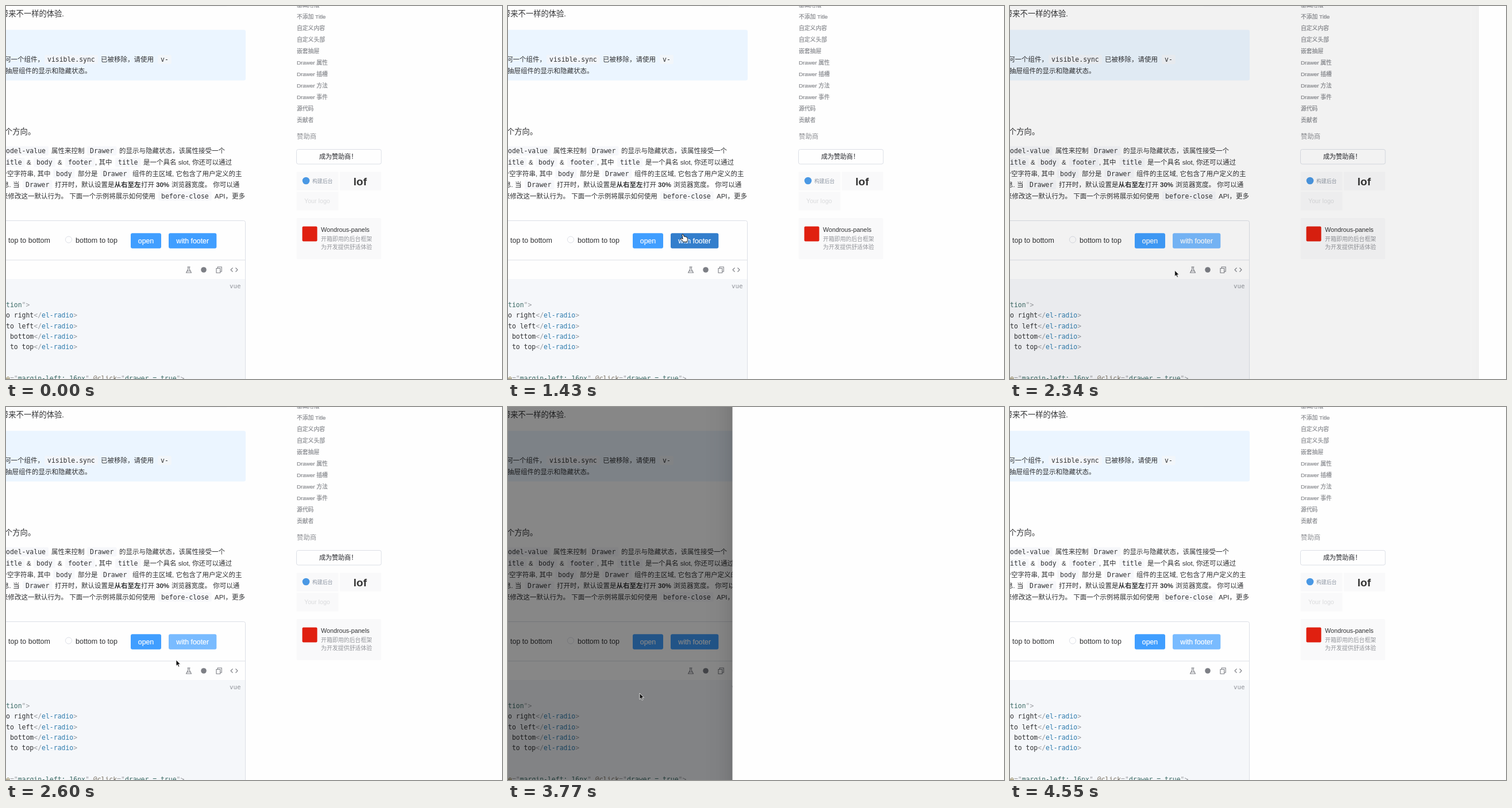
Animation, 863 px wide and 649 px high, one loop 4810 ms. Source, as an HTML page:

```html
<!DOCTYPE html>
<html lang="zh-CN">
<head>
<meta charset="utf-8">
<style>
html, body { margin: 0; width: 100%; height: 100%; overflow: hidden; background: #fefefe; }
svg, #mask { position: absolute; left: 0; top: 0; width: 863px; height: 649px; }
text { font-family: "Liberation Sans", "Noto Sans CJK SC", sans-serif; white-space: pre; fill: #303133; }
.code { font-family: "DejaVu Sans Mono", "Noto Sans CJK SC", monospace; }
.medium { stroke: currentColor; stroke-width: .2px; }
.icon { fill: none; stroke: #7d7f85; stroke-width: 1.1; }
.line { fill: none; stroke: #dcdfe6; }
#mask { background: #000; }
#drawer { position: absolute; left: 0; top: -60px; width: 600px; height: 770px; background: #fefefe;
  box-shadow: 0 13px 40px 13px rgba(0,0,0,calc(.07 * var(--shown))),
    0 10px 27px rgba(0,0,0,calc(.1 * var(--shown))), 0 7px 13px -7px rgba(0,0,0,calc(.14 * var(--shown))); }
</style>
</head>
<body>
<svg id="page" viewBox="0 0 863 649"></svg>
<div id="mask"></div>
<div id="drawer"></div>
<svg viewBox="0 0 863 649">
  <g id="cursor">
    <path id="arrow" d="M0 0V10.6L2.4 8.4L4.1 12.2L5.8 11.4L4.2 7.7H7.5Z" fill="#111" stroke="#fff" stroke-width=".8"/>
    <path id="hand" d="M-1.3 .8Q0-.8 1.2 .8L2.2 4.2Q3.4 3.4 4.3 4.6Q5.4 4 6.2 5.2Q7.6 5 8 6.6L8.4 9.6L7.4 13.6H1.4L-3.4 8.6Q-4 6.8-2.2 7L.2 8.3Z"
      fill="#fff" stroke="#111" stroke-width="1"/>
  </g>
</svg>
<script>
const $ = id => document.getElementById(id);
const CHAR = 6.9, MONO = CHAR / .602;

const text = (x, y, size, str, color = '#303133', attrs = '') =>
  `<text x="${x}" y="${y + size * .37}" font-size="${size}" style="fill:${color};color:${color}" ${attrs}>${str}</text>`;
const rect = (x, y, w, h, fill, r = 0, attrs = '') =>
  `<rect x="${x}" y="${y}" width="${w}" height="${h}" rx="${r}" fill="${fill}" ${attrs}/>`;
const body = (x, y, str, attrs) => text(x, y, 11.5, str, '#303133', attrs);
const mono = (x, y, str, color) => text(x, y, MONO, str, color, 'class="code"');
const pill = (x, y, str) =>
  rect(x - 5, y - 8, str.length * CHAR + 10, 16, '#f4f6f9', 2, 'opacity=".8"') + mono(x, y, str);
const span = (color, str) => `<tspan style="fill:${color}">${str}</tspan>`;
const medium = 'class="medium"', bold = 'font-weight="700"';
const grey = '#999b9f', teal = '#3c6b66';

// A row alternates plain strings and `code` pills, each with its own x.
const row = (y, ...parts) => parts.map(([x, str]) =>
  str[0] === '`' ? pill(x, y, str.slice(1)) : body(x, y, str)).join('');

const article = [
  text(-9, 13.5, 13.3, '带来不一样的体验.'),
  rect(336, -10, 49, 10.5, '#f4f6f9', 2),
  rect(-10, 41.5, 427, 88, '#ebf5ff', 3),
  row(93, [-3, '何一个组件，'], [72, '`visible.sync'], [165, '已被移除，请使用'], [269, '`v-']),
  row(113, [-1, '抽屉组件的显示和隐藏状态。']),
  text(-2, 218, 13.3, '个方向。'),
  row(252, [0, '`odel-value'], [79, '属性来控制'], [146, '`Drawer'], [197, '的显示与隐藏状态，该属性接受一个']),
  row(272, [0, '`itle'], [36, '&amp;'], [53, '`body'], [90, '&amp;'], [108, '`footer'], [155, ', 其中'],
    [195, '`title'], [239, '是一个具名 slot, 你还可以通过']),
  row(291.5, [-9.5, '个空字符串, 其中'], [87, '`body'], [125, '部分是'], [169, '`Drawer'],
    [220, '组件的主区域, 它包含了用户定义的主']),
  row(311, [-6, '息. 当'], [34, '`Drawer'], [85, '打开时，默认设置是'], [235, '打开'], [288, '浏览器宽度。 你可以通']),
  body(188.5, 311, '从右至左', bold), body(261, 311, '30%', bold),
  row(330.5, [-8, '来修改这一默认行为。 下面一个示例将展示如何使用'], [270, '`before-close'], [363, 'API，更多'])
];

const button = (x, w, label, id) => rect(x, 395.3, w, 26.5, '#409eff', 3, `id="${id}"`) +
  text(x + w / 2, 408.7, 12.3, label, '#fff', 'class="medium" text-anchor="middle"');

const tagEnd = span(grey, '&lt;/') + span('#2f7cae', 'el-radio') + span(grey, '&gt;');
const demo = [
  rect(-10, 373.5, 426.5, 300, 'none', 3, 'class="line"'),
  rect(0, 475, 416, 174, '#f5f7fa'),
  '<path class="line" d="M0 442H416"/>',
  text(4, 407, 12.5, 'top to bottom'),
  '<circle class="line" cx="109" cy="406.5" r="5.6"/>',
  text(121, 407, 12.5, 'bottom to top'),
  button(217, 53, 'open', 'open'), button(283, 83.3, 'with footer', 'footer'),
  `<path class="icon" d="M315.5 454H320.5M316.8 454V458L313.6 464H322.4L319.2 458V454M315.4 461H320.6
    M368.2 456V454H375.2V462H373M366 456.5H372.7V464.3H366ZM394.5 455.5L391 459L394.5 462.5M399.5 455.5L403 459L399.5 462.5"/>`,
  '<circle cx="344" cy="459" r="4.8" fill="#7d7f85"/>',
  text(389, 487, 10.8, 'vue', '#909399', 'class="code"'),
  mono(0, 519.5, span(teal, 'tion') + span(grey, '"&gt;')),
  ...['o right', 'to left', ' bottom', ' to top'].map((s, i) => mono(0, 538 + i * 18.35, s + tagEnd)),
  mono(0, 648, span('#8a7a4a', 'e') + span(grey, '="') + span(teal, 'margin-left: 16px') + span(grey, '" ') +
    span('#7d7466', '@click') + span(grey, '="') + span(teal, 'drawer = true') + span(grey, '"&gt;'))
];

const links = ['基础用法', '不添加 Title', '自定义内容', '自定义头部', '嵌套抽屉', 'Drawer 属性',
  'Drawer 插槽', 'Drawer 方法', 'Drawer 事件', '源代码', '贡献者'];
const card = '#f9f9fa';
const sidebar = [
  ...links.map((s, i) => text(506, -2 + i * 20, 9.8, s, '#85878c', medium)),
  text(506, 226.5, 11.4, '赞助商', '#8c8e93'),
  rect(505.5, 249.5, 147.5, 25.5, '#fefefe', 3, 'stroke="#dcdfe6"'),
  text(545, 262.3, 11, '成为赞助商！', '#48494d', medium),
  rect(505.5, 288.5, 73, 32.5, card), rect(580.5, 288.5, 72.5, 32.5, card),
  rect(505.5, 323, 73, 32.5, card), rect(505.5, 369, 147.5, 71.5, card, 2),
  '<circle cx="522" cy="304" r="6.3" fill="#4a98e4"/>',
  text(533, 304.7, 8.9, '构建后台', '#8d96a3'),
  text(604.5, 304.7, 19, 'lof', '#333', bold),
  text(519, 339.3, 10.7, 'Your logo', '#dadbdd'),
  rect(515.5, 383.5, 26, 26, '#e02010', 2),
  text(548, 389.3, 10.8, 'Wondrous-panels'),
  text(548, 405.3, 9.9, '开箱即用的后台框架', '#94969b'),
  text(548, 419.3, 9.9, '为开发提供舒适体验', '#94969b')
];
$('page').innerHTML = [...article, ...demo, ...sidebar].join('');

const STEP = 130, LOOP = 4810, STAGE = 863, OPEN_EDGE = 390.5, DIM = .47;
// Each visit: press the button, then dismiss the drawer.
const visits = [{ hover: 1170, press: 1430, close: 2153 }, { hover: 2730, press: 2860, close: 3865 }];
const path = [[650, 140, 660], [1170, 304, 397], [1690, 304, 397], [2080, 282, 470], [2210, 282, 470],
  [2600, 296, 440], [2730, 304, 402], [3120, 304, 402], [3770, 229, 498], [4030, 128, 584], [4160, 78, 660]];

const clamp = v => Math.min(1, Math.max(0, v));
function ease(x) {
  let lo = 0, hi = 1;
  const bezier = (s, a, b) => 3 * s * (1 - s) * ((1 - s) * a + s * b) + s ** 3;
  for (let i = 0; i < 20; i++) {
    const mid = (lo + hi) / 2;
    bezier(mid, .25, .25) < x ? lo = mid : hi = mid;
  }
  return bezier(lo, .1, 1);
}

function cursorAt(t) {
  const i = path.findIndex(p => p[0] > t);
  if (i < 1) return path[0].slice(1);
  const [t0, x0, y0] = path[i - 1], [t1, x1, y1] = path[i], k = (t - t0) / (t1 - t0);
  return [x0 + (x1 - x0) * k, y0 + (y1 - y0) * k];
}

function buttonColor(t) {
  if (visits.some(v => t >= v.press && t < v.press + STEP)) return '#337ecc';
  const covered = visits.some(v => t >= v.press && t < v.close);
  return t < visits[0].hover || covered ? '#409eff' : '#79bbff';
}

function draw(now) {
  const t = Math.min(Math.floor(now % LOOP / STEP), 35) * STEP;
  const shown = visits.reduce((sum, v) =>
    sum + ease(clamp((t - v.press) / 300)) - ease(clamp((t - v.close) / 300)), 0);
  const drawer = $('drawer').style;
  $('mask').style.opacity = shown * DIM;
  drawer.display = shown > .001 ? 'block' : 'none';
  drawer.setProperty('--shown', shown.toFixed(3));
  drawer.transform = `translateX(${STAGE - (STAGE - OPEN_EDGE) * shown}px)`;
  $('footer').setAttribute('fill', buttonColor(t));

  const [x, y] = cursorAt(t), over = x > 283 && x < 366 && y > 395 && y < 422;
  $('cursor').setAttribute('transform', `translate(${x} ${y})`);
  $('hand').style.display = over ? '' : 'none';
  $('arrow').style.display = over ? 'none' : '';
  requestAnimationFrame(() => draw(performance.now() - start));
}
const start = performance.now();
draw(0);
</script>
</body>
</html>
```
